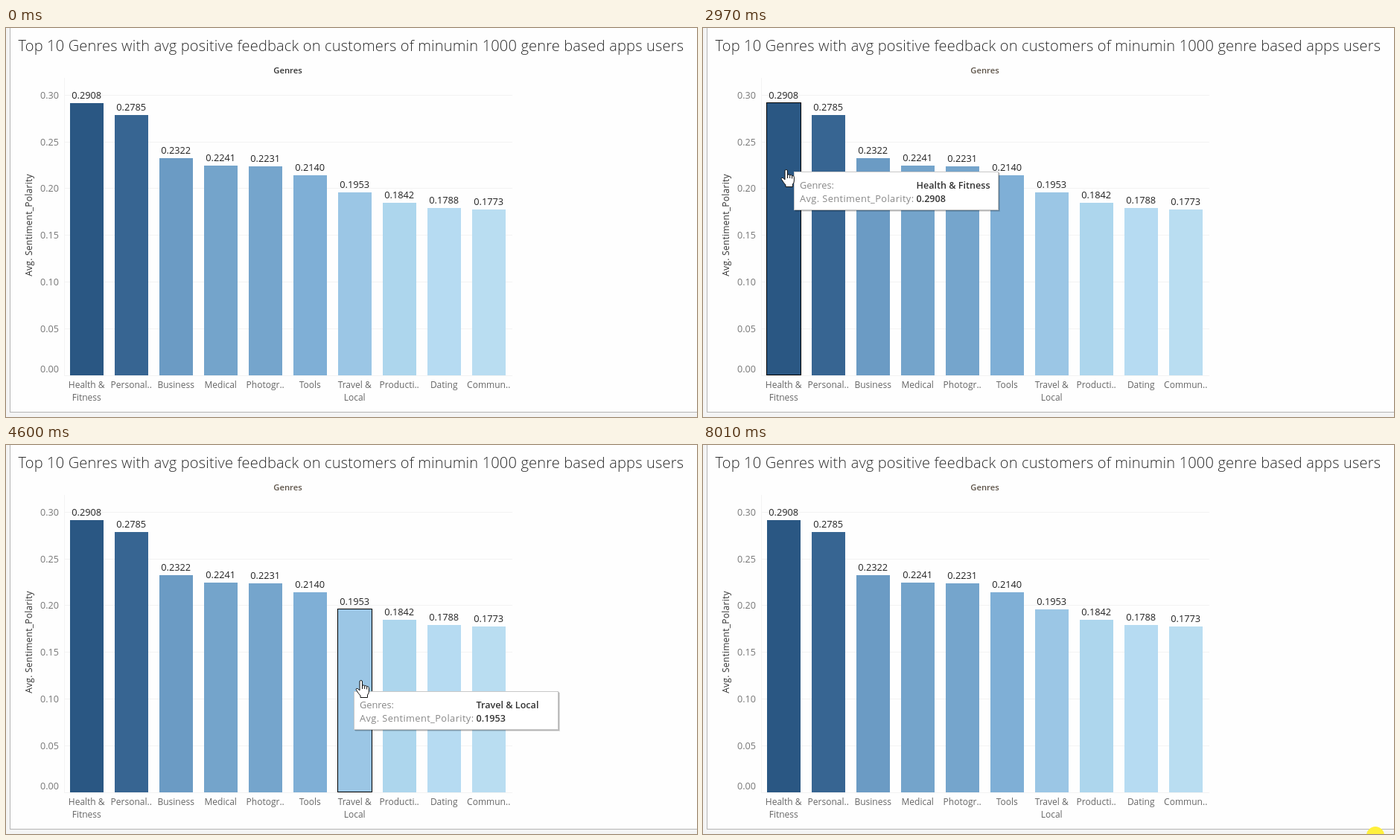
These frames come from a looping animation (928 by 523 pixels, 8060 ms). An HTML page:

```html
<!DOCTYPE html>
<html lang="en">
<head>
<meta charset="utf-8">
<title>Genre feedback chart</title>
<style>
  html, body { margin: 0; width: 100%; height: 100%; overflow: hidden; background: #f4f4f4; }
  svg { display: block; width: 928px; height: 523px; font-family: "Open Sans", "Noto Sans", sans-serif; }
  .title { font-size: 20px; font-weight: 300; letter-spacing: .18px; fill: #2b2b2b; }
  .head { font-size: 11.3px; font-weight: 600; text-anchor: middle; }
  .axis { font-size: 12px; font-weight: 500; letter-spacing: .25px; text-anchor: middle; fill: #333; }
  .tick { font-size: 12.6px; text-anchor: end; fill: #777; }
  .value { font-size: 12.8px; text-anchor: middle; fill: #222; }
  .name { font-size: 12px; text-anchor: middle; fill: #666; }
  .key { font-size: 12.8px; fill: #888; }
  .long { letter-spacing: .4px; }
  .fact { font-size: 12.6px; font-weight: 600; fill: #333; }
  .cursor { fill: #fff; stroke: #111; stroke-linejoin: round; }
</style>
</head>
<body>
<svg viewBox="0 0 928 523">
  <rect width="928" height="523" fill="#f4f4f4"/>
  <rect x="5.5" y="-2" width="930" height="518.5" fill="#fefefe" stroke="#b5b5b5"/>
  <text class="title" x="16.5" y="31">Top 10 Genres with avg positive feedback on customers of minumin 1000 genre based apps users</text>
  <text class="head" id="head" x="378.5" y="61">Genres</text>
  <text class="axis" transform="translate(35 265) rotate(-90)">Avg. Sentiment_Polarity</text>
  <g id="chart"></g>
  <rect id="outline" x="85.5" width="46" fill="none" stroke="#000"/>
  <g id="tip">
    <rect x="2" y="2" width="275" height="52" fill="#000" opacity=".12"/>
    <rect x="1" y="1" width="275" height="52" fill="#000" opacity=".2"/>
    <rect x=".5" y=".5" width="274" height="51" fill="#fff" stroke="#c8c8c8"/>
    <text class="key" x="8" y="22.5">Genres:</text>
    <text class="key long" x="8" y="40.5">Avg. Sentiment_Polarity:</text>
    <text class="fact" id="tipName" x="164.5" y="22.5"></text>
    <text class="fact" id="tipValue" x="164.5" y="40.5"></text>
  </g>
  <path class="cursor" id="arrow" d="M.5 .5V16.5L4.2 13 6.6 18.8 9.2 17.7 6.8 12H12Z"/>
  <g class="cursor" id="hand">
    <path d="M-2 2Q-2 .5-.3 .5T1.5 2V8Q1.7 6.8 3.2 6.9T4.7 8.4Q5 7.4 6.3 7.6T7.6 9.2Q8 8.4 9.2 8.8T10.4 10.6V15Q10.4 18 8.5 20V23.5H-1V21Q-3.5 18.5-6.5 13.5-7.4 12-6.2 11.4-4.8 10.8-2 14Z"/>
    <path d="M1.5 8V12M4.7 8.4V12M7.6 9.2V12.5" fill="none"/>
  </g>
  <circle id="click" cx="903" cy="525" r="12" fill="#fff03c"/>
</svg>
<script>
const LOOP = 8060, BASE = 467, SCALE = 1258, PITCH = 60;

// full name, value, colour, axis label lines
const bars = [
  ["Health & Fitness", .2908, "#2a5783", "Health &", "Fitness"],
  ["Personalization", .2785, "#376592", "Personal.."],
  ["Business", .2322, "#6b9bc4", "Business"],
  ["Medical", .2241, "#74a4cb", "Medical"],
  ["Photography", .2231, "#75a5cc", "Photogr.."],
  ["Tools", .2140, "#7fafd6", "Tools"],
  ["Travel & Local", .1953, "#9bc6e5", "Travel &", "Local"],
  ["Productivity", .1842, "#add6ed", "Producti.."],
  ["Dating", .1788, "#b6dbf2", "Dating"],
  ["Communication", .1773, "#b9ddf1", "Commun.."]
].map(([name, value, fill, ...lines]) =>
  ({ name, value, fill, lines, top: Math.round(BASE - value * SCALE) }));

// The screen refreshes in bursts: start, end, number of steps
const bursts = [
  [330, 1120, 14], [1190, 1310, 3], [1480, 1670, 4], [1900, 2250, 6], [2430, 3190, 13],
  [3240, 3980, 13], [4050, 4840, 14], [4910, 5430, 10], [6070, 6430, 6]
];

// Pointer path: time, x, y
const path = [
  [0, 905, 535], [270, 905, 535], [330, 900, 505], [500, 820, 330], [700, 640, 170],
  [900, 420, 90], [1120, 250, 57], [1310, 217, 47], [1480, 205, 48], [1670, 150, 55],
  [1900, 140, 57], [2250, 82, 72], [2430, 78, 77], [2495, 78, 77], [2750, 100, 150],
  [3190, 129, 245], [3303, 138, 254], [3363, 141, 256], [3425, 150, 259], [3858, 269, 285],
  [3918, 279, 288], [3980, 308, 291], [4050, 312, 292], [4537, 453, 315], [4597, 477, 316],
  [4840, 588, 323], [4910, 598, 324], [5350, 637, 328], [6010, 637, 328], [6070, 650, 340],
  [6430, 905, 545]
];
const LAG = 60;

const $ = id => document.getElementById(id);

function add(tag, attrs, text) {
  const el = document.createElementNS("http://www.w3.org/2000/svg", tag);
  for (const key in attrs) el.setAttribute(key, attrs[key]);
  if (text) el.textContent = text;
  $("chart").append(el);
}

function drawChart() {
  for (let i = 0; i <= 6; i++) {
    const y = Math.round(BASE - i * .05 * SCALE);
    add("rect", { x: 78, y, width: 602, height: 1, fill: "#f3f3f3" });
    add("text", { class: "tick", x: 71, y: (i ? y : 458) + 5 }, (i * .05).toFixed(2));
  }
  add("rect", { x: 78, y: 67, width: 1, height: 400, fill: "#f3f3f3" });
  bars.forEach((bar, i) => {
    const x = 108.2 + i * PITCH;
    add("rect", { x: 86 + i * PITCH, y: bar.top, width: 45, height: BASE - bar.top, fill: bar.fill });
    add("text", { class: "value", x, y: bar.top - 6 }, bar.value.toFixed(4));
    bar.lines.forEach((line, n) => add("text", { class: "name", x, y: 484 + n * 17 }, line));
  });
}

function lastStep(t) {
  let time = 0;
  for (const [start, end, count] of bursts) {
    if (t < start) break;
    const gap = (end - start) / (count - 1);
    time = start + gap * Math.min(count - 1, Math.floor((t - start) / gap + 1e-6));
  }
  return time;
}

function pointer(t) {
  const i = path.findIndex(p => p[0] > t);
  if (i < 0) return path[path.length - 1].slice(1);
  const [a, b] = [path[i - 1], path[i]];
  const k = (t - a[0]) / (b[0] - a[0]);
  return [a[1] + (b[1] - a[1]) * k, a[2] + (b[2] - a[2]) * k];
}

// The gap to the right of a bar still belongs to it
function barAt([x, y]) {
  const i = Math.floor((x - 86) / PITCH);
  return i >= 0 && x < 671 && y < BASE && bars[i] && y > bars[i].top ? i : -1;
}

const show = (id, on) => $(id).setAttribute("visibility", on ? "visible" : "hidden");
const move = (id, x, y) => $(id).setAttribute("transform", `translate(${Math.round(x)} ${Math.round(y)})`);

function draw(t) {
  const time = lastStep(t);
  const now = pointer(time), late = pointer(Math.max(0, time - LAG));
  const over = barAt(now) >= 0, active = over ? barAt(late) : -1;

  move("arrow", ...now);
  move("hand", ...now);
  show("arrow", !over);
  show("hand", over);
  show("tip", active >= 0);
  show("outline", active >= 0);
  if (active >= 0) {
    const bar = bars[active];
    move("outline", active * PITCH, 0);
    $("outline").setAttribute("y", bar.top - .5);
    $("outline").setAttribute("height", BASE - bar.top);
    move("tip", Math.min(651, late[0] + 14), late[1] + 16);
    $("tipName").textContent = bar.name;
    $("tipValue").textContent = bar.value.toFixed(4);
  }
  $("head").setAttribute("fill", t < 330 ? "#333" : "#5d5348");
  show("click", t >= 8010);
}

drawChart();
const begin = performance.now();
function tick() {
  draw((performance.now() - begin) % LOOP);
  requestAnimationFrame(tick);
}
tick();
</script>
</body>
</html>
```
